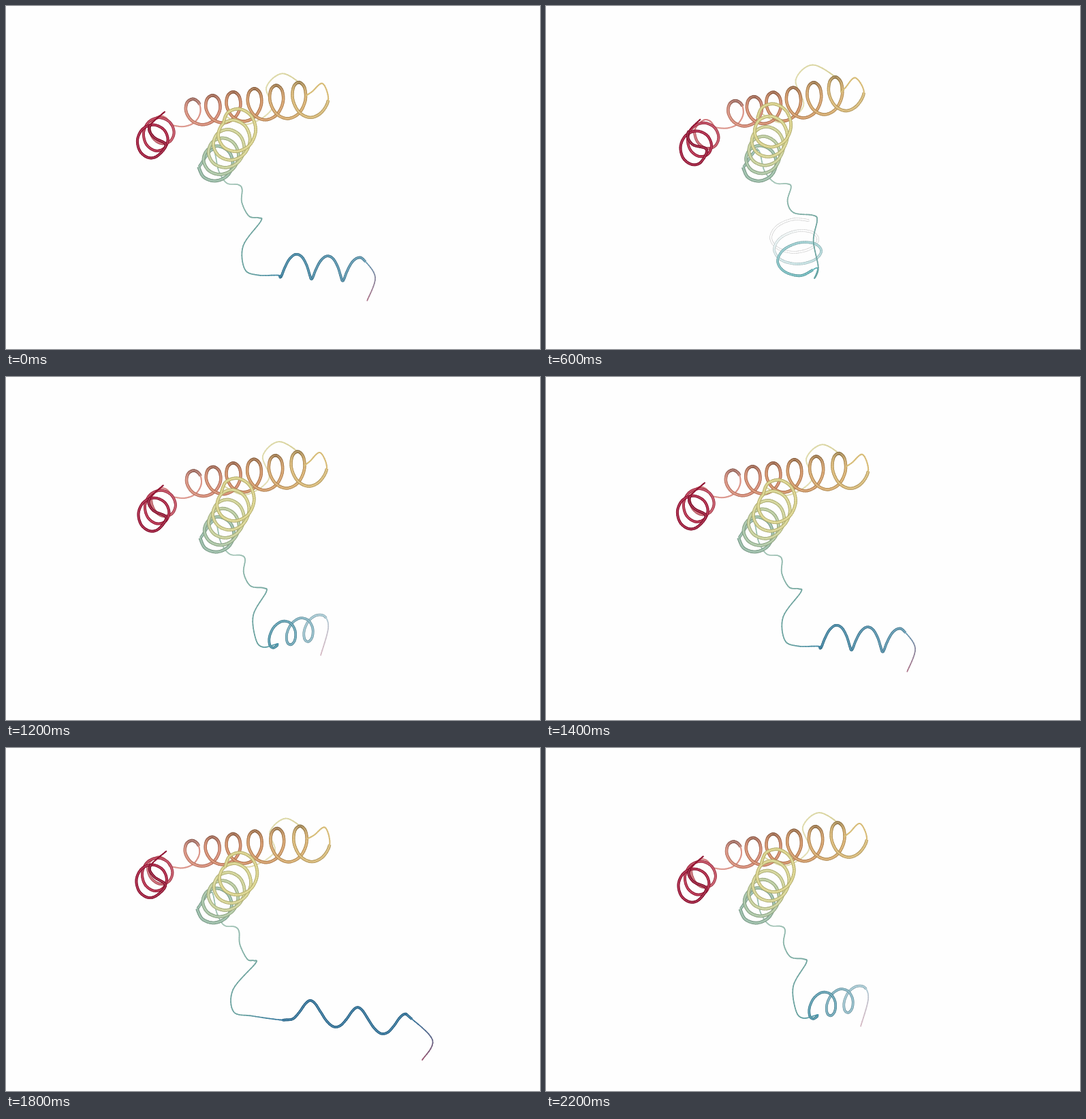
These frames come from a looping animation (784x504 px, 2.4 s). An HTML page with a canvas:

```html
<!DOCTYPE html>
<html lang="en">
<head>
<meta charset="utf-8">
<title>Coil motion</title>
<style>
html, body { margin: 0; width: 100%; height: 100%; overflow: hidden; background: #fefefe; }
canvas { display: block; }
</style>
</head>
<body>
<canvas id="stage" width="784" height="504"></canvas>
<script>
const ctx = document.getElementById('stage').getContext('2d');
const WHITE = [254, 254, 254], BLACK = [0, 0, 0];
const STEPS = 8;

const hex = h => [1, 3, 5].map(i => parseInt(h.slice(i, i + 2), 16));
const lerp = (a, b, t) => a + (b - a) * t;
const mix = (a, b, t) => a.map((v, i) => lerp(v, b[i], t));
const css = c => `rgb(${c.map(Math.round)})`;
const clamp = v => Math.max(0, Math.min(1, v));
const ramp = (...list) => {
  const stops = list.map(hex), n = stops.length - 1;
  return u => {
    const i = Math.min(n - 1, Math.floor(u * n));
    return mix(stops[i], stops[i + 1], u * n - i);
  };
};

// Rows are x, y at rest and the shift per unit of swing.
const swing = (rows, s) => rows.map(([x, y, dx, dy]) => [x + s * dx, y + s * dy]);

// Samples a coil eight times per turn.
function coil(from, to, at) {
  const out = [];
  for (let t = from; t <= to; t += 0.125) out.push(at(t, Math.cos(2 * Math.PI * t), Math.sin(2 * Math.PI * t)));
  return out;
}

function spline(pts) {
  const out = [], n = pts.length;
  for (let i = 0; i < n - 1; i++) {
    const a = pts[Math.max(0, i - 1)], b = pts[i], c = pts[i + 1], d = pts[Math.min(n - 1, i + 2)];
    for (let k = 0; k < STEPS; k++) {
      const t = k / STEPS;
      out.push([0, 1].map(j => b[j] + t / 2 * (c[j] - a[j] +
        t * (2 * a[j] - 5 * b[j] + 4 * c[j] - d[j] + t * (3 * (b[j] - c[j]) + d[j] - a[j])))));
    }
  }
  out.push(pts[n - 1]);
  return out;
}

function line(a, b, color, width) {
  const dx = b[0] - a[0], dy = b[1] - a[1], e = 0.5 / (Math.hypot(dx, dy) || 1);
  ctx.strokeStyle = css(color);
  ctx.lineWidth = width;
  ctx.beginPath();
  ctx.moveTo(a[0] - dx * e, a[1] - dy * e);
  ctx.lineTo(b[0] + dx * e, b[1] + dy * e);
  ctx.stroke();
}

// Draws a shaded tube through the knots; color and width depend on 0..1 along it.
function tube(knots, color, width, { back = false, topShade = 0 } = {}) {
  const pts = spline(knots), n = pts.length - 1;
  for (let k = 0; k < n; k++) {
    const i = back ? n - 1 - k : k, u = i / n, w = width(u);
    const a = pts[i], b = pts[i + 1];
    let c = color(u);
    if (w < 2.6) {
      line(a, b, c, w);
      continue;
    }
    if (topShade) {
      const lean = (a[0] - b[0]) / (Math.hypot(b[0] - a[0], b[1] - a[1]) || 1);
      c = mix(c, BLACK, topShade * clamp(lean));
    }
    line(a, b, mix(c, BLACK, 0.2), w);
    line(a, b, c, w * 0.68);
    line(a, b, mix(c, WHITE, 0.24), w * 0.3);
  }
}

const TIP = [[231, 159, -5.6, 9.4], [210, 180, -2, 8], [216, 196, -1.5, 9], [235, 206, 1, 6]];
const NECK = [[226, 164, 6, 5], [237, 166, 5, 4], [244, 176, 5, 3]];
const HOOK = [[461, 111, -9, -7], [446, 124, -8, -5], [438, 130, -6, -4]];
const ARCH = [
  [433, 114, -6, -8], [401, 95, -12, -10.6], [377, 116, -13, -9],
  [386, 150, -10, -4], [352, 173, -7, -2], [319, 160, -7, -5]
];
const LINK = [
  [286, 236, 5.5, 0.5], [306, 211, 6, 0], [315, 242, 7, 0], [328, 260, 10, -0.4], [345, 262, 11, -1],
  [351, 268, 11, -2.5], [349, 288, 7, -1], [359, 307, 6, -4], [378, 310, 18, -3], [382, 316, 20, -1],
  [363, 350, 37, -6], [367, 386, 41, -2], [378, 397, 20, 4], [399, 392, -1, -9]
];

const redColor = ramp('#8f1230', '#a3173a', '#b32343', '#c44f60', '#d88d8b');
const orangeColor = ramp('#dc9a92', '#d98a74', '#d58a68', '#d2905f', '#d5a066', '#d9b26c', '#d8c07c');
const archColor = ramp('#cfc083', '#dcd8a6', '#e3dfb6', '#dcd8a0');
const yellowColor = ramp('#d9cf83', '#dbd58a', '#d6d490', '#c5d09a', '#a3c3a5', '#93b9a5');
const linkColor = ramp('#93b9a5', '#a5c5b8', '#83b0a6', '#6da39f', '#68a3a2');

function redKnots(s) {
  const rings = coil(-0.1, 2.3, (t, c, q) => [
    212 + 3.5 * s + (9.5 + 1.2 * s) * t + 2 * c - 20 * q,
    205 + 8.2 * s - (11 + 1.2 * s) * t + 21.7 * c + q
  ]);
  return [...swing(TIP, s), ...rings, ...swing(NECK, s)];
}

function orangeKnots(s) {
  const loops = coil(-0.5, 5.85, (t, c, q) => [
    276 + 28 * t + 0.5 * t * t - 17.5 * q + s * (3.2 - 1.5 * t),
    157 - 4.25 * t - (19.5 + 1.35 * t) * c + s * (2 - 0.2 * t - 0.3 * t * t)
  ]);
  return [...swing(NECK.slice(-1), s), ...loops, ...swing(HOOK, s)];
}

function yellowKnots(s) {
  return coil(0.25, 5.25, (t, c, q) => {
    const u = (t - 0.25) / 5;
    return [
      342 - 34 * u + s * (12.5 * u - 7) - lerp(26, 23, u) * q,
      170 + 67 * u ** 0.8 + s * (7 * u - 6.5) + lerp(27.5, 22.5, u) * c
    ];
  });
}

function tailKnots(s) {
  const s2 = s * s;
  const vx = 25.5 - 46.5 * s + 10.5 * s2, vy = -4.5 - 17 * s + 1.5 * s2;
  const rx = 12.5 + 22 * s + 5 * s2, ry = 18.3 + 2 * s;
  const waves = coil(0, 2.625, (t, c, q) => [
    393 - 23 * s + vx * t - rx * q,
    379.5 - 4 * s + vy * t + ry * c + 3 * q
  ]);
  const end = [
    [473 - 154 * s + 47 * s2, 370 - 70 * s + 5 * s2],
    [462 - 155 * s + 39 * s2, 409 - 58 * s + 5 * s2]
  ];
  return [...swing(LINK, s), ...waves, ...end];
}

function drawTail(s) {
  const knots = tailKnots(s), last = knots.length - 1, start = LINK.length - 1;
  const body = mix(hex('#2f739b'), hex('#62b4b8'), clamp((s + 0.8) / 1.6));
  const depth = 0.85 * Math.max(0, s + 0.8) ** 1.6;
  const color = u => {
    const i = u * last;
    let c = mix(linkColor(Math.min(1, i / start)), body, clamp((i - start + 1.5) / 1.5));
    c = mix(c, hex('#a0506a'), clamp((i - last + 2) / 2));
    return mix(c, WHITE, Math.min(1, depth * clamp((i - start) / (last - start))));
  };
  const width = u => {
    const i = u * last;
    if (i < 1) return 4;
    return i < start + 0.3 || i > last - 2 ? 1.7 : 3.6;
  };
  tube(knots, color, width, { back: true });
}

function draw(s) {
  ctx.fillStyle = css(WHITE);
  ctx.fillRect(0, 0, 784, 504);
  drawTail(s);
  tube(swing([...HOOK.slice(-1), ...ARCH], s), archColor, () => 1.9);
  tube(orangeKnots(s), orangeColor, u => u < 0.07 || u > 0.94 ? 2 : 4.4, { topShade: 0.24 });
  tube(yellowKnots(s), yellowColor, () => 4.6, { back: true });
  tube(redKnots(s), redColor, u => u < 0.03 || u > 0.88 ? 2 : 3.9, { back: true });
}

// Triangle swing in steps of 100 ms, with an uneven start.
const INTRO = [-0.4, -0.2, 0.2, 0.2, 0.6, 0.6, 0.8];
function swingAt(ms) {
  const slot = Math.floor(ms % 2400 / 100);
  return slot < INTRO.length ? INTRO[slot] : Math.abs(Math.min(slot, 22) - 17) / 5 - 1;
}

function frame() {
  draw(swingAt(performance.now()));
  requestAnimationFrame(frame);
}
frame();
</script>
</body>
</html>
```
